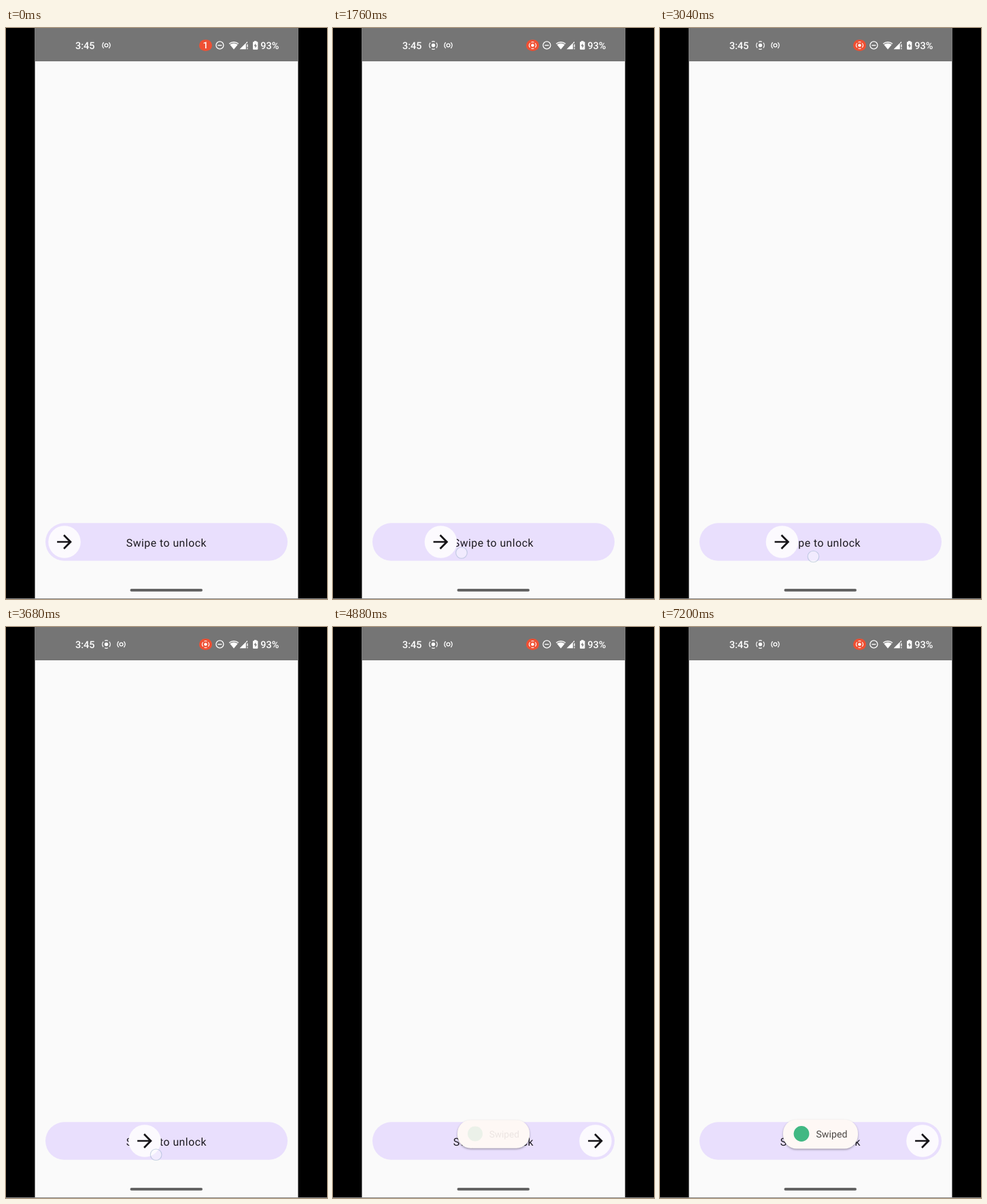
Recreate the animation shown at these times as an HTML page with a canvas. Size 472 px wide and 840 px high, loop 7280 ms.

```html
<!DOCTYPE html>
<html lang="en">
<head>
<meta charset="utf-8">
<title>Swipe to unlock</title>
<style>
  html, body { margin: 0; width: 100%; height: 100%; overflow: hidden; background: #000; }
  canvas { display: block; width: 472px; height: 840px; }
</style>
</head>
<body>
<canvas id="stage"></canvas>
<script>
const W = 472, H = 840, LOOP = 7280, STEP = 80, TAU = Math.PI * 2;
const canvas = document.getElementById('stage');
const ctx = canvas.getContext('2d');
const dpr = window.devicePixelRatio || 1;
canvas.width = W * dpr;
canvas.height = H * dpr;

const HOME = 86, END = 386, KNOB_Y = 756;
const SCREEN = { left: 42.5, width: 387 };

// power shapes the ease-out of the pull, settle is the decay time after release
const drags = [
  { start: 1120, release: 1840, reach: 158.5, rest: HOME, power: 3.6, settle: 38, from: { x: 104, y: 768 }, to: { x: 189, y: 772 } },
  { start: 2400, release: 3040, reach: 179.5, rest: HOME, power: 1.5, settle: 44, from: { x: 106, y: 764 }, to: { x: 225.5, y: 777.5 } },
  { start: 3520, release: 4240, reach: 339, rest: END, power: 2.5, settle: 85, from: { x: 104, y: 766 }, to: { x: 354, y: 788 } }
];

const clamp01 = v => Math.min(1, Math.max(0, v));
const smooth = p => p * p * (3 - 2 * p);
const mix = (a, b, p) => a + (b - a) * p;
const currentDrag = t => drags.findLast(d => t >= d.start);

function pull(drag, t) {
  const p = clamp01((t - drag.start) / (drag.release - drag.start));
  return 1 - (1 - p) ** drag.power;
}

function knobX(t) {
  const drag = currentDrag(t);
  if (!drag) return HOME;
  if (t <= drag.release) return mix(HOME, drag.reach, pull(drag, t));
  return mix(drag.rest, drag.reach, Math.exp((drag.release - t) / drag.settle));
}

function rect(x, y, w, h, color) {
  ctx.fillStyle = color;
  ctx.fillRect(x, y, w, h);
}

function pill(x, y, w, h, color, r = h / 2) {
  ctx.fillStyle = color;
  ctx.beginPath();
  ctx.roundRect(x, y, w, h, r);
  ctx.fill();
}

function disc(x, y, r, color) {
  ctx.fillStyle = color;
  ctx.beginPath();
  ctx.arc(x, y, r, 0, TAU);
  ctx.fill();
}

function arc(x, y, r, mid = 0, spread = Math.PI, width = 1.3, color = '#fff') {
  ctx.strokeStyle = color;
  ctx.lineWidth = width;
  ctx.beginPath();
  ctx.arc(x, y, r, mid - spread, mid + spread);
  ctx.stroke();
}

function shape(path, x, y, scale, color) {
  ctx.save();
  ctx.translate(x, y);
  ctx.scale(scale, scale);
  ctx.fillStyle = color;
  ctx.fill(new Path2D(path));
  ctx.restore();
}

function text(str, x, y, font, color, spacing = 0) {
  ctx.font = font + ' Roboto, sans-serif';
  ctx.letterSpacing = spacing + 'px';
  ctx.fillStyle = color;
  ctx.fillText(str, x, y);
}

function withAlpha(alpha, draw) {
  if (alpha <= 0) return;
  ctx.save();
  ctx.globalAlpha = alpha;
  draw();
  ctx.restore();
}

function broadcastIcon(x, y) {
  arc(x, y, 2.4);
  for (const mid of [0, Math.PI]) arc(x, y, 5.7, mid, 0.85);
}

function recordIcon(x, y, scale) {
  disc(x, y, 2.7 * scale, '#fff');
  for (let i = 0; i < 4; i++) {
    arc(x, y, 5.8 * scale, i * Math.PI / 2, i % 2 ? 0.42 : 0.72, 1.25 * scale);
  }
}

function wifiIcon(x, y) {
  arc(x, y, 10.6, -Math.PI / 2, 0.7, 1.5);
  ctx.fillStyle = '#fff';
  ctx.beginPath();
  ctx.moveTo(x, y);
  ctx.arc(x, y, 8.9, -Math.PI / 2 - 0.7, -Math.PI / 2 + 0.7);
  ctx.fill();
}

function statusBar(t) {
  const p = smooth(clamp01((t - 40) / 600));
  rect(SCREEN.left, 0, SCREEN.width, 49, '#757575');
  text('3:45', 102, 30.5, '500 14.5px', '#fff');
  withAlpha(p, () => recordIcon(147.5, 25.5, 1));
  broadcastIcon(mix(147.5, 169.5, p), 25.5);

  pill(284, 17.2, 19, 16.6, '#ef5033');
  withAlpha(1 - p, () => text('1', 289.5, 30.3, '500 13.5px', '#fff'));
  withAlpha(p, () => recordIcon(293.5, 25.5, 0.85));

  arc(314.4, 25.4, 5.5);
  rect(311.4, 24.8, 6, 1.4, '#fff');
  wifiIcon(335, 31.4);
  shape('M0 11.5 L11.5 0 V2.8 H9.3 V11.5 Z', 343.5, 19.8, 1, '#fff');
  rect(354.2, 24, 1.4, 4.3, '#fff');
  rect(354.2, 29.6, 1.4, 1.6, '#fff');

  pill(363, 20.2, 7.4, 11.6, '#fff', 1);
  rect(365, 19, 3.4, 1.5, '#fff');
  shape('M2.6 0 L0 4.2 H1.9 V7.4 L4.4 3.2 H2.6 Z', 364.6, 22.4, 1, '#757575');
  text('93%', 374.3, 30.5, '500 14.5px', '#fff');
}

function slider(t) {
  const x = knobX(t);
  pill(58, 728.3, 356, 55.5, '#e9dffd');
  text('Swipe to unlock', 176.8, 762.5, '15.8px', '#1d1b20', 0.49);
  disc(x, KNOB_Y, 23.8, '#fcfafe');
  shape('M0-8l-1.41 1.41L4.17-1H-8v2H4.17l-5.58 5.59L0 8l8-8z', x, KNOB_Y, 1.36, '#161418');
}

function finger(t) {
  const drag = currentDrag(t);
  if (!drag || t > drag.release) return;
  const p = pull(drag, t);
  const x = mix(drag.from.x, drag.to.x, p), y = mix(drag.from.y, drag.to.y, p);
  disc(x, y, 8.4, 'rgba(252,253,255,0.4)');
  arc(x, y, 8.3, 0, Math.PI, 1.1, 'rgba(130,160,190,0.42)');
}

function toast(t) {
  if (t < 4880) return;
  const p = clamp01((t - 4880) / 320);
  const scale = mix(0.964, 1, smooth(p));
  ctx.save();
  ctx.translate(236, 746);
  ctx.scale(scale, scale);
  ctx.translate(-236, -746);
  ctx.save();
  ctx.shadowColor = 'rgba(0,0,0,0.32)';
  ctx.shadowBlur = 3 * dpr;
  ctx.shadowOffsetY = 1.4 * dpr;
  pill(181, 724.5, 110, 43, '#fef8f5', 20);
  ctx.restore();
  withAlpha(mix(0.1, 1, p), () => {
    disc(208, 745.5, 11.4, '#41b883');
    text('Swiped', 229.4, 750.8, '14.2px', '#4c4845');
  });
  ctx.restore();
}

function render(now) {
  const t = Math.floor((now % LOOP) / STEP) * STEP;
  ctx.setTransform(dpr, 0, 0, dpr, 0, 0);
  ctx.textRendering = 'geometricPrecision';
  rect(0, 0, W, H, '#000');
  rect(SCREEN.left, 0, SCREEN.width, H, '#fafafa');
  statusBar(t);
  slider(t);
  pill(182.5, 825, 106.5, 4, '#646464');
  finger(t);
  toast(t);
  rect(0, 839, W, 1, '#8c8c8c');
}

const start = performance.now();
function loop() {
  render(performance.now() - start);
  requestAnimationFrame(loop);
}
loop();
</script>
</body>
</html>
```
